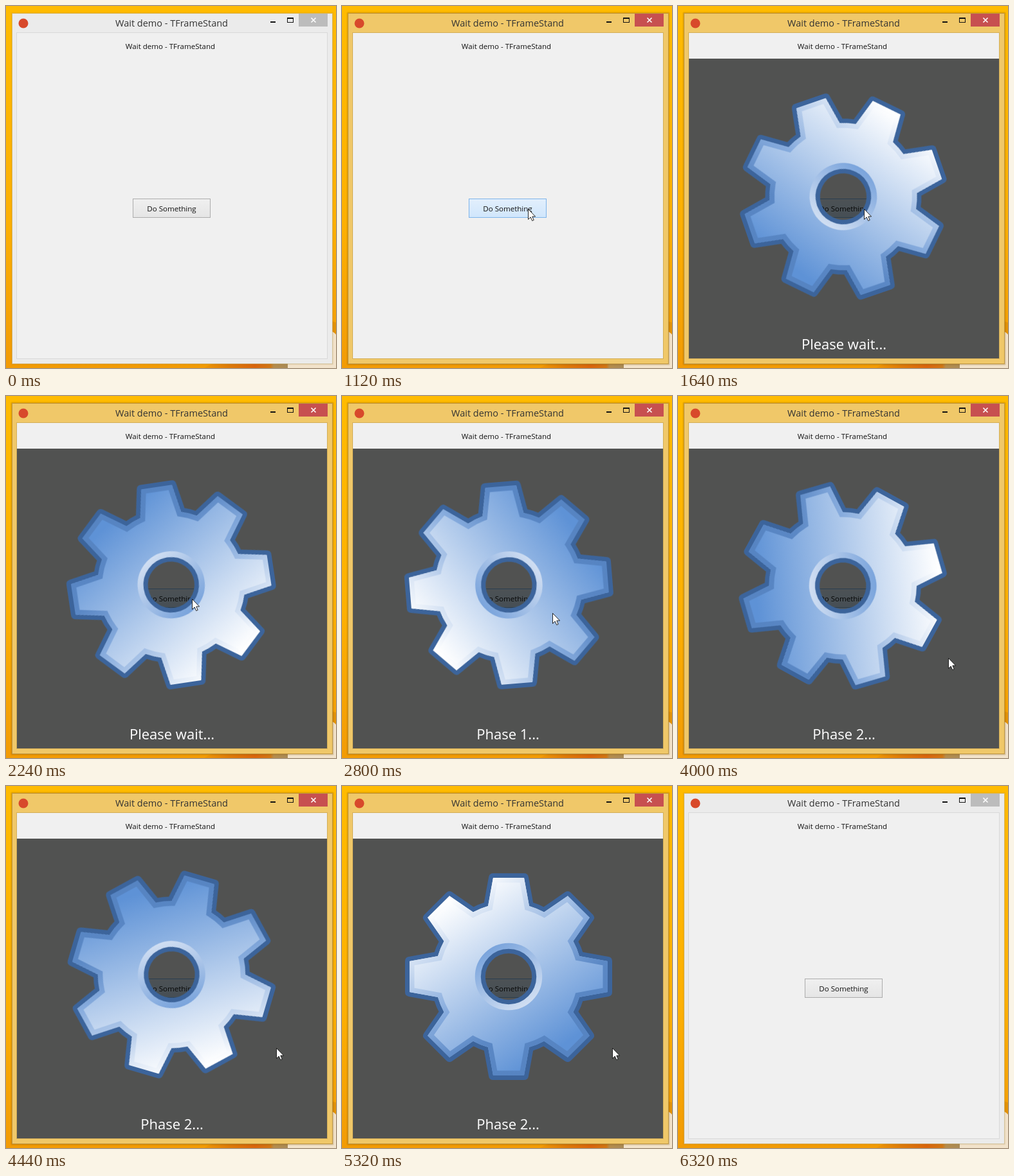
Write an HTML page that moves like this. It is 513 px wide and 564 px high and loops after 6.4 s.

```html
<!DOCTYPE html>
<html lang="en">
<head>
<meta charset="utf-8">
<title>Wait demo</title>
<style>
html, body { margin: 0; width: 100%; height: 100%; overflow: hidden; background: #fdb400; }
svg { display: block; width: 513px; height: 564px; }
text { font-family: "Open Sans", "Noto Sans", sans-serif; text-anchor: middle; fill: #111; }
.small { font-size: 11.55px; }
.title { font-size: 14.5px; fill: #333; }
.status { font-size: 22px; fill: #fff; }

/* One loop is 6400 ms, so 1% = 64 ms and one 40 ms tick = 0.625% */
.active, .hover, .overlay, .gear, .cursor, .status {
  animation: 6400ms -1ms infinite step-end;
}
.active { animation-name: active; }
.hover { animation-name: hover; }
.overlay { animation-name: overlay; }
.gear { animation-name: spin; transform-origin: 258px 295.5px; }
.cursor { animation-name: move; }
.wait { animation-name: wait; }
.phase1 { animation-name: phase1; }
.phase2 { animation-name: phase2; }

@keyframes active { 0%, 98.75%, 100% { opacity: 0; } 16.875% { opacity: 1; } }
@keyframes hover { 0%, 98.75%, 100% { opacity: 0; } 15% { opacity: 1; } }
@keyframes wait { 0% { opacity: 1; } 35.625%, 100% { opacity: 0; } }
@keyframes phase1 { 0%, 51.875%, 100% { opacity: 0; } 35.625% { opacity: 1; } }
@keyframes phase2 { 0% { opacity: 0; } 51.875%, 100% { opacity: 1; } }
@keyframes overlay {
  0% { opacity: 0; }
  19.375% { opacity: 0; animation-timing-function: steps(6); }
  23.125% { opacity: 1; }
  83.75%, 100% { opacity: 0; }
}
@keyframes spin {
  0% { transform: rotate(0deg); }
  19.375% { transform: rotate(0deg); animation-timing-function: steps(10); }
  25.625% { transform: rotate(71deg); animation-timing-function: steps(29); }
  43.75% { transform: rotate(265.3deg); animation-timing-function: steps(18); }
  55% { transform: rotate(394.3deg); animation-timing-function: steps(23); }
  69.375% { transform: rotate(556.3deg); animation-timing-function: steps(22); }
  83.125%, 100% { transform: rotate(720deg); }
}
@keyframes move {
  0% { transform: translate(396px, 570px); }
  6.25% { transform: translate(396px, 552px); animation-timing-function: steps(6); }
  10% { transform: translate(350px, 440px); animation-timing-function: steps(8); }
  15% { transform: translate(290px, 322px); animation-timing-function: steps(2); }
  16.25% { transform: translate(289px, 316px); }
  40% { transform: translate(289px, 316px); animation-timing-function: steps(6); }
  43.75% { transform: translate(327px, 338px); animation-timing-function: steps(7); }
  48.125% { transform: translate(420px, 408px); }
  90% { transform: translate(420px, 408px); animation-timing-function: steps(8); }
  95%, 100% { transform: translate(470px, 570px); }
}
</style>
</head>
<body>
<svg viewBox="0 0 513 564" xmlns="http://www.w3.org/2000/svg">
  <defs>
    <linearGradient id="desk" x1="0" y1="0" x2="0" y2="1">
      <stop offset="0" stop-color="#ffbb00"/>
      <stop offset=".6" stop-color="#fdb002"/>
      <stop offset="1" stop-color="#f29b05"/>
    </linearGradient>
    <linearGradient id="petal" gradientUnits="userSpaceOnUse" x1="308" y1="0" x2="440" y2="0">
      <stop offset="0" stop-color="#ee9605"/>
      <stop offset=".3" stop-color="#dd7a08"/>
      <stop offset=".6" stop-color="#d9640c"/>
      <stop offset=".78" stop-color="#d07614"/>
      <stop offset=".82" stop-color="#b58c4c"/>
      <stop offset="1" stop-color="#a88a58"/>
    </linearGradient>
    <linearGradient id="btn" x1="0" y1="0" x2="0" y2="1">
      <stop offset="0" stop-color="#f0f0f0"/>
      <stop offset="1" stop-color="#e5e5e5"/>
    </linearGradient>
    <linearGradient id="btnHot" x1="0" y1="0" x2="0" y2="1">
      <stop offset="0" stop-color="#e2effc"/>
      <stop offset="1" stop-color="#d0e6fc"/>
    </linearGradient>
    <linearGradient id="face" gradientUnits="userSpaceOnUse" x1="175" y1="172.5" x2="335" y2="409">
      <stop offset="0" stop-color="#fff"/>
      <stop offset="1" stop-color="#5e92d6"/>
    </linearGradient>
    <linearGradient id="bevel" gradientUnits="userSpaceOnUse" x1="175" y1="172.5" x2="335" y2="409">
      <stop offset="0" stop-color="#fff"/>
      <stop offset=".25" stop-color="#bed2ed"/>
      <stop offset=".5" stop-color="#86abdd"/>
      <stop offset=".75" stop-color="#5b88c5"/>
      <stop offset="1" stop-color="#5684c2"/>
    </linearGradient>
    <linearGradient id="hub" gradientUnits="userSpaceOnUse" x1="230" y1="254" x2="288" y2="340">
      <stop offset="0" stop-color="#7aa4dc"/>
      <stop offset="1" stop-color="#d0def2"/>
    </linearGradient>
    <clipPath id="inside"><path class="outline"/></clipPath>
  </defs>

  <!-- desktop -->
  <rect width="513" height="564" fill="url(#desk)"/>
  <path d="M308 564Q318 557 330 556H440V564Z" fill="url(#petal)"/>
  <path d="M500 488Q508 492 513 493V512L500 505Z" fill="#e39207"/>
  <path d="M438 564V556H500V504Q508 506 513 512V564Z" fill="#f2e3cb"/>

  <!-- window -->
  <rect x="8.5" y="10.5" width="500" height="548" rx="1" fill="none" stroke="#7a5000" stroke-opacity=".08" stroke-width="2"/>
  <rect x="10" y="12" width="497" height="545" fill="#ebebeb"/>
  <rect x="9.5" y="11.5" width="498" height="546" fill="none" stroke="#c9b98c" stroke-opacity=".7"/>
  <rect x="455" y="12" width="45" height="20" fill="#bcbcbc"/>
  <rect x="16.5" y="41.5" width="483" height="508" fill="#f0f0f0" stroke="#d9d9d9"/>
  <g class="active">
    <rect x="8.5" y="10.5" width="500" height="548" rx="1" fill="none" stroke="#7a5000" stroke-opacity=".12" stroke-width="3"/>
    <rect x="10" y="12" width="497" height="545" fill="#f0c869"/>
    <rect x="9.5" y="11.5" width="498" height="546" fill="none" stroke="#bd9440"/>
    <rect x="455" y="12" width="45" height="20" fill="#c75050"/>
    <rect x="16.5" y="41.5" width="483" height="508" fill="#f0f0f0" stroke="#d3ae58"/>
  </g>
  <circle cx="27" cy="27" r="7.5" fill="#d8492b"/>
  <text class="title" x="257.5" y="32">Wait demo - TFrameStand</text>
  <path d="M411 24h8v2h-8zM437 18h10v8h-10zM438 20v5h8v-5z" fill="#111" fill-rule="evenodd"/>
  <path d="M474.5 18.5l7 7m0-7l-7 7" stroke="#fff" stroke-width="1.6"/>

  <!-- form -->
  <text class="small" x="255.5" y="67">Wait demo - TFrameStand</text>
  <rect x="197.5" y="300.5" width="120" height="29" fill="url(#btn)" stroke="#acacac"/>
  <rect class="hover" x="197.5" y="300.5" width="120" height="29" fill="url(#btnHot)" stroke="#7eb4ea"/>
  <text class="small" x="257.5" y="320">Do Something</text>

  <!-- wait layer -->
  <g class="overlay">
    <rect x="17" y="82" width="482" height="467" fill="#000300" fill-opacity=".664"/>
    <g class="gear">
      <path class="outline" fill="none" stroke="#3c649b" stroke-width="14" stroke-linejoin="round"/>
      <path class="body" fill="url(#face)" fill-rule="evenodd"/>
      <path class="outline" fill="none" stroke="url(#bevel)" stroke-width="15" clip-path="url(#inside)"/>
      <circle cx="259" cy="297" r="47.5" fill="none" stroke="url(#hub)" stroke-width="9.5"/>
      <circle cx="259" cy="297" r="39.7" fill="none" stroke="#3c649b" stroke-width="7"/>
    </g>
    <text class="status wait" x="258" y="535">Please wait...</text>
    <text class="status phase1" x="258" y="535">Phase 1...</text>
    <text class="status phase2" x="258" y="535">Phase 2...</text>
  </g>

  <path class="cursor" d="M.5 .5V16.5L4.2 13L6.7 18.6L9.2 17.5L6.8 12H11.6Z" fill="#fff" stroke="#111" stroke-width=".9"/>
</svg>
<script>
const cx = 259, cy = 297, teeth = 8;
const tip = [24, 154], base = [32, 110];

// Turns a point given as (sideways, outward) on tooth i into stage coordinates
function place([side, out], i) {
  const a = i * 2 * Math.PI / teeth, c = Math.cos(a), s = Math.sin(a);
  return (cx + side * c + out * s).toFixed(2) + " " + (cy + side * s - out * c).toFixed(2);
}

const r = Math.hypot(...base).toFixed(2);
let d = "";
for (let i = 0; i < teeth; i++) {
  d += (i ? `A${r} ${r} 0 0 1 ` : "M") + place([-base[0], base[1]], i);
  d += "L" + place([-tip[0], tip[1]], i) + "L" + place(tip, i) + "L" + place(base, i);
}
d += `A${r} ${r} 0 0 1 ${place([-base[0], base[1]], 0)}Z`;

const hole = `M${cx - 40} ${cy}a40 40 0 1 0 80 0a40 40 0 1 0 -80 0Z`;
document.querySelectorAll(".outline").forEach(p => p.setAttribute("d", d));
document.querySelector(".body").setAttribute("d", d + hole);
</script>
</body>
</html>
```
